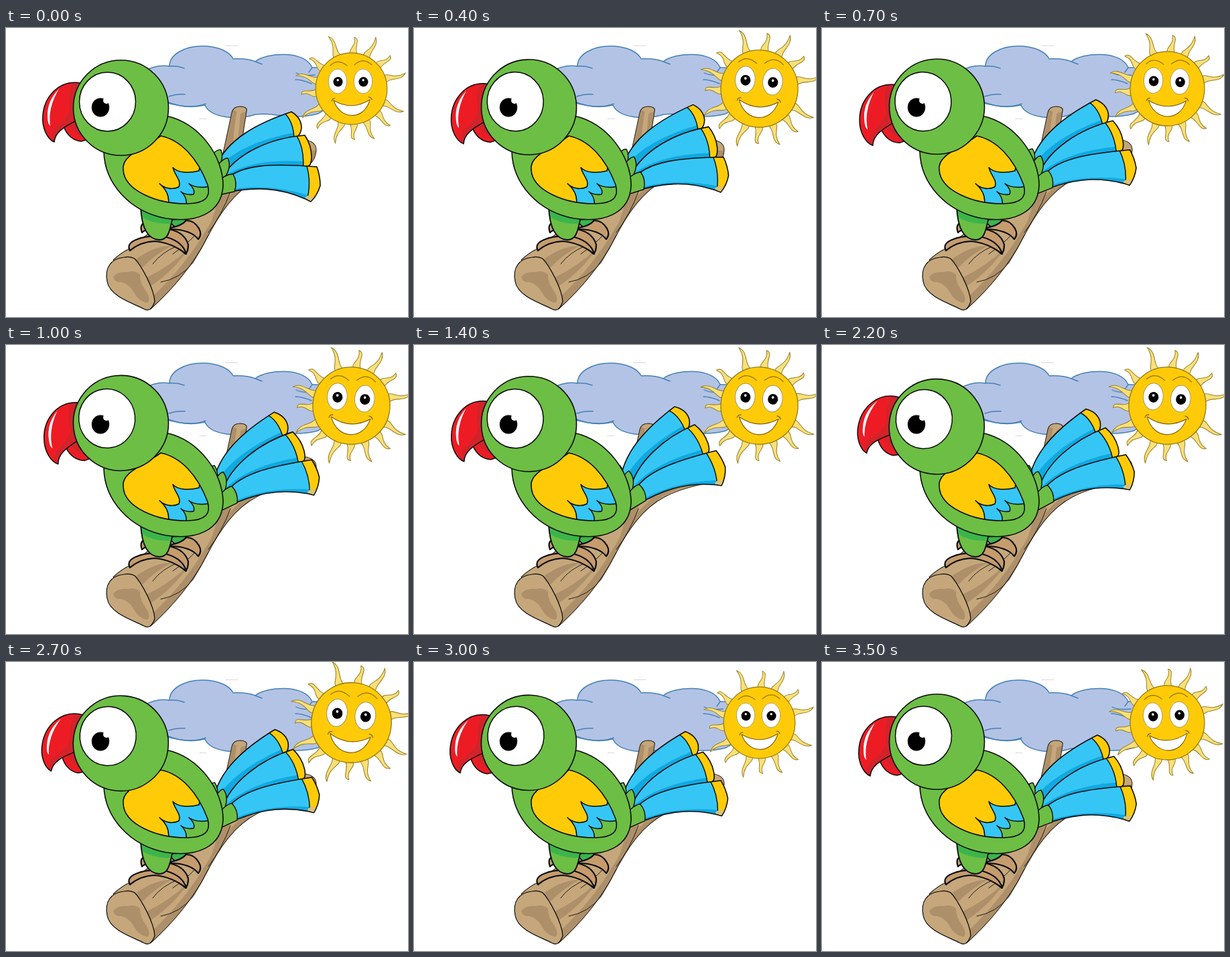
These frames come from a looping animation (600 px wide and 431 px high, 4100 ms). An HTML page with a canvas:

```html
<!DOCTYPE html>
<html lang="en">
<head>
<meta charset="utf-8">
<title>Parrot and sun</title>
<style>
html, body { margin: 0; width: 100%; height: 100%; overflow: hidden; background: #fff; }
canvas { display: block; width: 600px; height: 431px; }
</style>
</head>
<body>
<canvas id="stage" width="600" height="431"></canvas>
<script>
const ctx = document.getElementById('stage').getContext('2d');
const LOOP = 4100, STEP = 100, LAST = 3500;
const GREEN = '#6dbe45', SHADE = '#3bb54a', YELLOW = '#ffcb08', BLUE = '#35c6f6',
  DEEP = '#10a9e0', RED = '#ed1c24', DARKRED = '#d2232a', WOOD = '#ad906a',
  TAN = '#c5a77b', TOE = '#c69c6d', INK = '#0b0b0b';

function shape(d, fill, line, width = 1.6) {
  const p = new Path2D(d);
  if (fill) { ctx.fillStyle = fill; ctx.fill(p); }
  if (line) { ctx.strokeStyle = line; ctx.lineWidth = width; ctx.stroke(p); }
}

function oval(x, y, rx, ry, fill, line, width = 1.6) {
  ctx.beginPath();
  ctx.ellipse(x, y, rx, ry, 0, 0, Math.PI * 2);
  ctx.fillStyle = fill;
  ctx.fill();
  if (line) { ctx.strokeStyle = line; ctx.lineWidth = width; ctx.stroke(); }
}

function clipped(d, draw) {
  ctx.save();
  ctx.clip(new Path2D(d));
  draw();
  ctx.restore();
}

// Rotates (degrees) and scales a part around a pivot.
function turn(x, y, deg, scale, draw) {
  ctx.save();
  ctx.translate(x, y);
  ctx.rotate(deg * Math.PI / 180);
  ctx.scale(scale, scale);
  ctx.translate(-x, -y);
  draw();
  ctx.restore();
}

// Linear interpolation over [time, value] pairs.
function track(keys, t) {
  for (let i = 1; i < keys.length; i++) {
    const [t0, a] = keys[i - 1], [t1, b] = keys[i];
    if (t <= t1) return a + (b - a) * (t - t0) / (t1 - t0);
  }
  return keys[keys.length - 1][1];
}

const headKeys = [[0, 0], [400, -2.2], [1000, -6], [1800, 0], [2200, 6.4], [2400, 7], [2700, 5.4], [3500, 0]];
const tailKeys = [[0, 0], [1500, 20], [1800, 18.6], [2200, 16.3], [2700, 13], [3500, 8.2]];
const sunKeys = [[0, 0], [300, 6.3], [400, 4.6], [500, -2.5], [600, 0]];

function cloud() {
  shape('M205,65 Q224,54 244,57 C244,39 267,27 293,27 C318,27 334,36 339,46 Q358,45 372,50 ' +
    'C390,36 446,33 457,59 Q485,58 493,76 Q500,112 465,128 Q440,135 405,130 Q388,127 372,129 ' +
    'C345,138 305,134 297,115 Q268,122 238,109 Z', '#b3c3e6', '#4682b4', 1.5);
  shape('M243,102 Q255,98 267,99 M238,111 Q276,122 298,113 M372,50 L382,54 M244,57 Q255,56 266,60 ' +
    'M432,77 Q442,77 456,83 M433,67 Q442,72 461,70 M457,59 L452,66', null, '#4682b4', 1.4);
  shape('M328,26.5 H346 M289,135.5 H299', null, '#dadada', 1);
}

function branch() {
  const trunk = 'M160,346 Q174,333 187,328 C235,285 295,250 320,205 L337,126 Q339,117 350,117 ' +
    'Q361,118 359,124 L355,150 L346,215 Q395,176 448,167 Q463,170 463,182 Q462,197 453,203 ' +
    'Q402,212 375,226 C340,244 318,278 299,315 C281,350 251,388 216,419 Z';
  shape(trunk, TAN);
  clipped(trunk, () => {
    shape('M335,124 L345,122 Q336,170 340,215 Q336,250 318,277 L306,290 Q323,245 318,205 Z ' +
      'M350,128 L362,122 L348,230 L341,220 Z M346,216 Q390,188 465,182 L463,207 Q390,205 355,238 Z ' +
      'M217,402 Q267,356 302,296 Q322,258 352,232 L380,230 L303,316 L222,426 Z', WOOD);
    shape('M192,346 Q222,324 247,325 Q222,338 204,357 Z M210,372 Q246,355 274,327 Q251,362 216,385 Z', WOOD);
    oval(349, 121, 9.5, 4, TAN);
  });
  shape(trunk, null, '#30271c', 1.1);
  shape('M219,352 Q232,334 258,324 M231,379 Q260,374 279,350 Q291,331 302,309 ' +
    'M302,305 Q322,279 335,244 M249,337 Q271,322 284,307', null, '#251c12', 1);
  shape('M151,378 C147,358 156,344 176,342 Q186,340 192,344 C202,354 221,389 222,408 ' +
    'Q216,425 206,419 C191,411 155,401 151,378 Z', TAN, INK, 1.2);
  shape('M160,371 Q167,362 182,364 Q193,361 200,368 Q200,380 208,391 Q217,404 211,410 ' +
    'Q198,408 190,393 Q184,382 172,379 Q162,380 160,371 Z', WOOD);
}

function feather(body, tip, shade, base) {
  shape(body, BLUE);
  clipped(body, () => {
    shape(shade, DEEP);
    shape(tip, YELLOW, INK, 1.4);
  });
  shape(body, null, INK);
  shape(base, GREEN, INK, 1.4);
}

function tail() {
  feather('M313,207 C330,166 375,142 426,125 Q441,134 441,149 Q440,158 435,162 C400,172 360,190 328,216 Z',
    'M412,124 Q430,137 430,168 L452,168 L449,118 Z',
    'M317,207 Q352,171 430,156 L434,172 L326,218 Z',
    'M307,190 Q315,180 321,182 Q325,193 319,205 L307,214 Z');
  feather('M323,222 C345,186 395,164 446,160 Q456,175 456,192 Q456,201 453,205 L440,211 C403,208 365,212 332,228 Z',
    'M431,156 Q447,179 443,214 L464,212 L460,155 Z',
    'M328,219 Q370,194 446,199 L442,215 L332,230 Z',
    'M313,208 Q324,194 331,194 Q337,207 327,222 L312,230 Z');
  feather('M326,228 C350,202 401,202 464,207 Q469,221 469,235 Q465,249 455,259 L447,255 C406,237 369,236 320,247 Z',
    'M447,200 Q458,231 447,264 L476,265 L475,198 Z',
    'M326,243 Q382,229 450,249 L449,261 L319,251 Z',
    'M313,231 Q329,217 339,218 Q346,230 341,244 L313,250 Z');
  clipped('M447,248 L462,249 L455,258 L447,254 Z', () => oval(453, 254, 7, 4, '#d9c27b'));
}

function feet() {
  shape('M244,286 Q249,298 258,298 Q267,295 269,284 Z', SHADE, INK, 1.8);
  const toe = d => shape(d, TOE, INK, 2.2);
  toe('M203,305 Q198,292 210,289 L226,290 L230,302 Q211,297 203,305 Z');
  toe('M246,298 Q262,295 269,287 Q281,287 288,299 Q293,308 287,315 Q276,301 247,300 Z');
  toe('M236,299 Q266,302 272,323 Q272,333 268,337 L240,314 Z');
  toe('M185,332 Q179,321 196,315 Q212,308 240,312 Q264,319 269,337 Q247,320 222,318 Q200,319 185,332 Z');
  const leg = 'M201,267 C202,288 207,315 229,316 C244,316 245,297 249,282 Z';
  shape(leg, GREEN);
  clipped(leg, () => shape('M198,264 L203,282 Q224,295 252,291 L254,270 Z', SHADE));
  shape(leg, null, INK, 1.9);
}

function body() {
  shape('M146,184 C147,232 185,274 239,284 C283,291 322,277 324,235 C324,191 289,142 239,131 Z', GREEN, INK);
  const wing = 'M175,211 C172,190 206,179 231,161 C261,167 286,194 301,234 C306,252 298,261 272,262 C225,263 176,242 175,211 Z';
  shape(wing, GREEN);
  clipped(wing, () => {
    shape('M170,150 H310 V235 Q285,241 273,232 Q283,241 280,248 Q269,250 261,244 Q271,252 269,266 H170 Z', BLUE, INK, 1.5);
    shape('M170,150 H300 L288,213 C272,217 256,216 249,208 C252,220 262,227 258,237 C248,242 236,239 229,232 ' +
      'Q246,246 242,266 H170 Z', YELLOW, INK, 1.5);
  });
  shape(wing, null, INK);
}

function head() {
  shape('M86,147 Q94,167 112,169 L123,166 L108,137 Z', RED, INK, 1.5);
  clipped('M87,147 Q94,166 112,168 L123,165 L108,137 Z', () =>
    shape('M93,138 Q96,157 121,164 L113,133 Z', DARKRED));
  const beak = 'M112,82 C78,76 57,104 55,130 C53,149 62,166 72,170 C73,156 85,148 107,137 Z';
  shape(beak, RED);
  clipped(beak, () => shape('M101,76 Q91,99 96,121 Q91,136 72,150 Q65,160 71,174 L115,146 V78 Z', DARKRED));
  shape(beak, null, INK, 1.5);
  shape('M79,91 Q61,109 62,132 Q62,143 66,146 Q62,119 79,91 Z', '#fff');
  oval(171.5, 119, 71, 71, GREEN, INK);
  oval(151.5, 110, 42, 44, '#fff', INK, 1.5);
}

function pupil() {
  oval(141, 118.5, 13.2, 14, '#000');
  oval(150, 108, 5, 5, '#fff');
}

function sun() {
  const cx = 515.5, cy = 90.5;
  const rays = [[-113, 85], [-86, 77], [-64, 85], [-40, 76], [-15.5, 84], [24, 85], [44, 80],
    [66, 82], [87, 76], [107, 85], [131, 78], [150, 85], [174, 75], [194, 85], [216, 77]];
  for (const [deg, r] of rays) {
    ctx.save();
    ctx.translate(cx, cy);
    ctx.rotate(deg * Math.PI / 180);
    shape(`M50,-5 C60,-10 63,4 ${r},-1 C74,10 62,-2 50,6 Z`, '#fae078', '#99842f', 1);
    ctx.restore();
  }
  oval(cx, cy, 53.3, 53.3, YELLOW, '#927715', 1.2);
  shape('M484,56 Q495,45 509,56 M520,55 Q533,43 546,55', null, '#a67c00', 1.3);
  for (const x of [495, 533]) {
    oval(x, 79.5, 13.7, 18.4, '#fff', '#a89758', 0.9);
    oval(x + .5, 80.3, 7, 7.3, '#000');
    oval(x + .2, 77.8, 1.7, 1.8, '#fff');
  }
  shape('M489,108 Q516,124 543,107 C535,138 499,138 489,108 Z', '#fff', '#80600f', 1.1);
  shape('M486,109 Q487,105 491,105 M541,103 Q545,103 546,107', null, '#80600f', 1.2);
}

function draw(t) {
  ctx.fillStyle = '#fff';
  ctx.fillRect(0, 0, 600, 431);
  ctx.lineJoin = ctx.lineCap = 'round';
  const beat = t % 600;
  const pulse = 1 + .12 * (1 - Math.abs(beat - 300) / 300);
  cloud();
  turn(515.5, 90.5, track(sunKeys, beat), pulse, sun);
  branch();
  turn(307, 222, -track(tailKeys, t), 1, tail);
  feet();
  body();
  turn(147, 118, track(headKeys, t), 1, head);
  pupil();
}

const start = performance.now();
function tick() {
  const now = Math.max(0, performance.now() - start) % LOOP;
  draw(Math.min(Math.floor(now / STEP) * STEP, LAST));
  requestAnimationFrame(tick);
}
tick();
</script>
</body>
</html>
```
